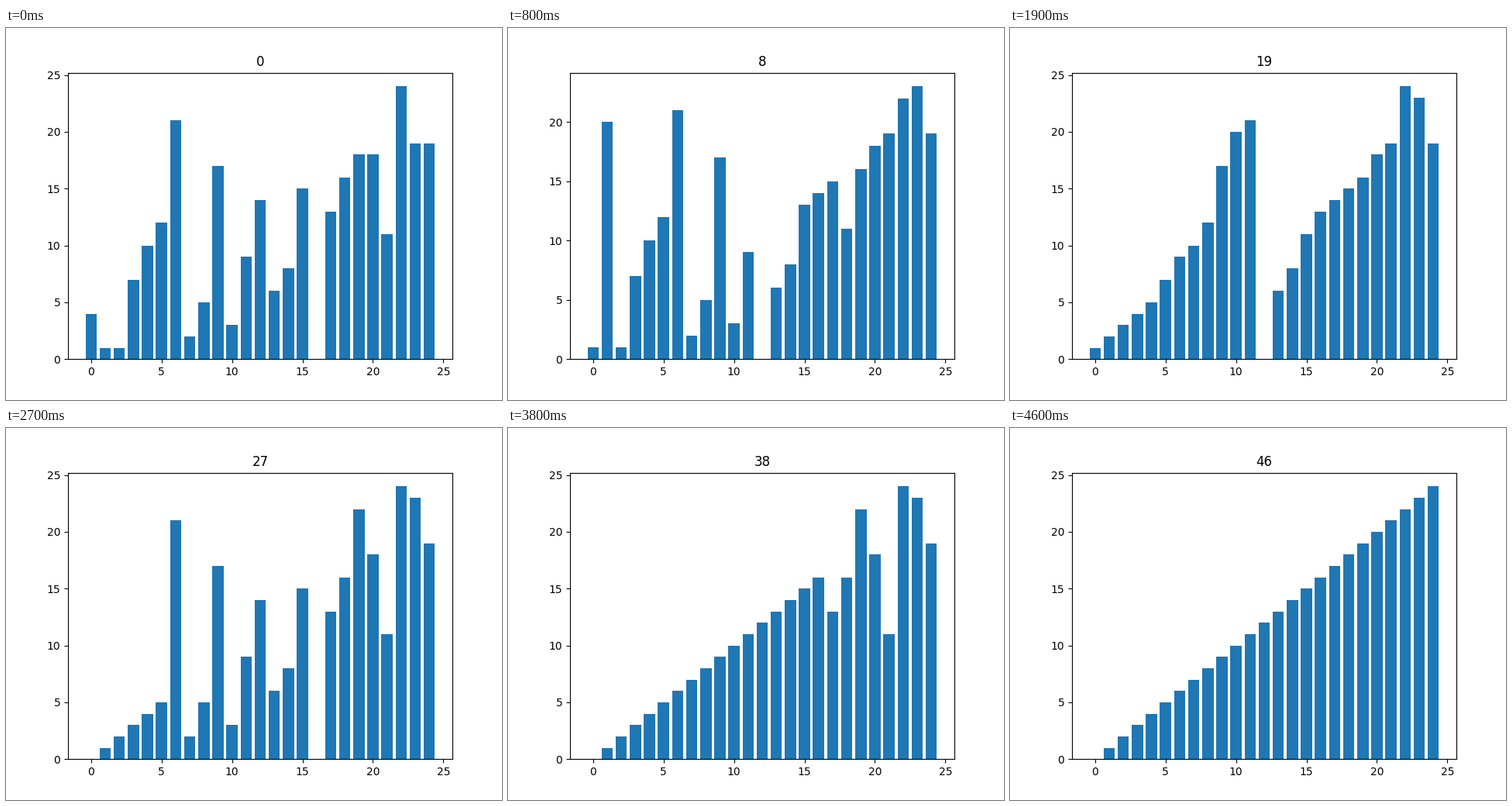
A matplotlib script that plays this animation: 640x480 px, repeating every 4700 ms.

```python
import matplotlib.pyplot as plt
from matplotlib.animation import FuncAnimation

VALUES = [4, 20, 1, 7, 10, 12, 21, 2, 5, 17, 3, 9, 14,
          6, 8, 15, 0, 13, 16, 22, 18, 11, 24, 23, 19]


def at(states, t):
    """State at step t, holding the last one once finished."""
    return states[min(t, len(states) - 1)]


def merge_states(vals):
    """States of a merge sort whose two halves run in parallel."""
    n = len(vals)
    if n < 2:
        return [vals]
    left = merge_states(vals[:n // 2])
    right = merge_states(vals[n // 2:])
    wait = max(len(left), len(right)) - 1
    states = [at(left, t) + at(right, t) for t in range(wait)]
    # The merge writes over the unsorted values, one per step.
    merged = sorted(vals)
    return states + [merged[:k] + vals[k:] for k in range(1, n + 1)]


states = merge_states(VALUES)

plt.rcParams["font.family"] = "DejaVu Sans"
fig, ax = plt.subplots(figsize=(6.4, 4.8), dpi=100)


def draw(i):
    ax.clear()
    ax.bar(range(len(VALUES)), states[i], color="#1f77b4")
    ax.set_title(str(i))


anim = FuncAnimation(fig, draw, frames=len(states), interval=100,
                     init_func=lambda: None, repeat=True, repeat_delay=0)
plt.show()
```
